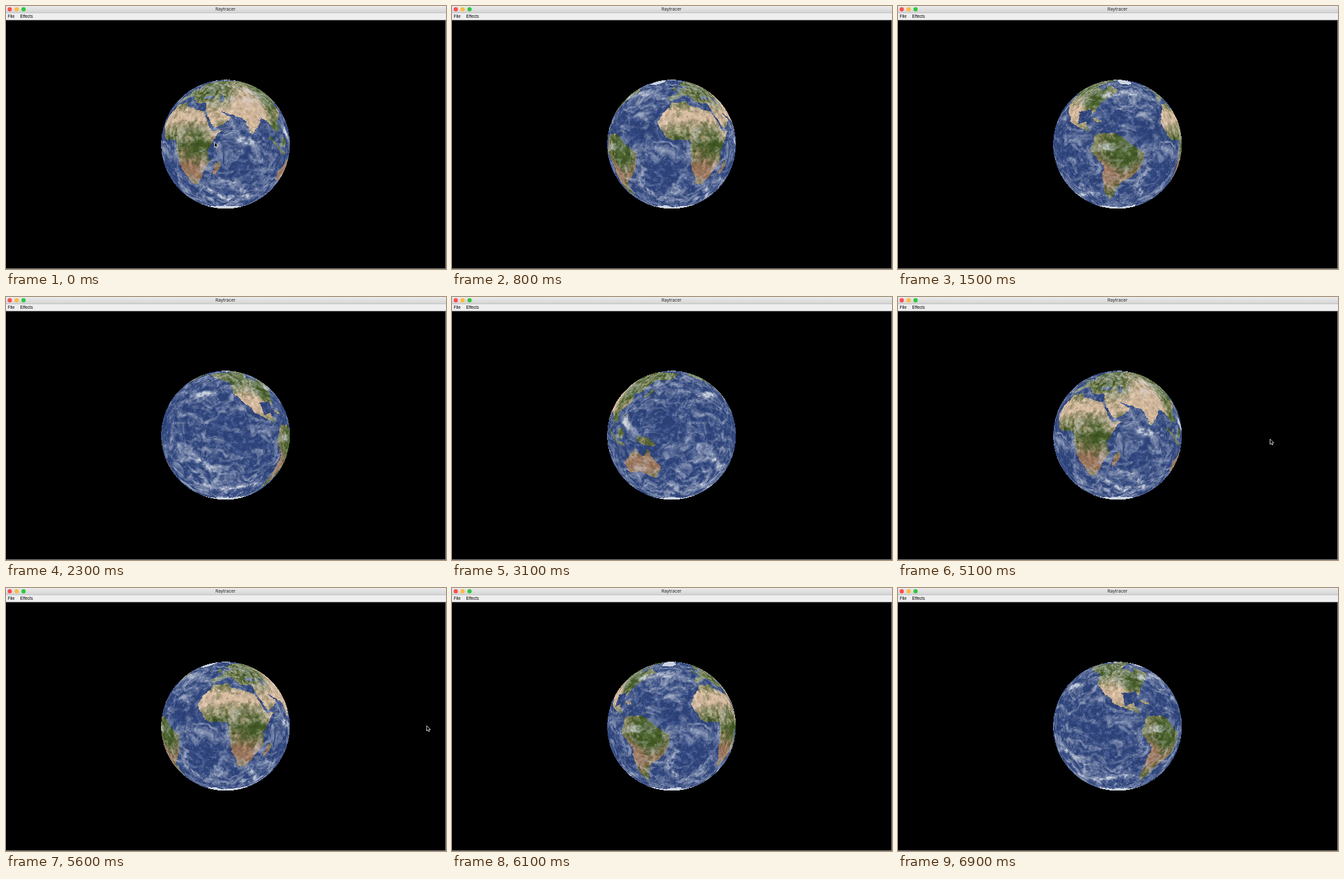
Animation, 670 px wide and 400 px high, one loop 7000 ms. Source, as an HTML page with a canvas:

```html
<!DOCTYPE html>
<html lang="en">
<head>
<meta charset="utf-8">
<title>Raytracer</title>
<style>
  html, body { margin: 0; width: 100%; height: 100%; overflow: hidden; background: #000; }
  #stage { position: absolute; left: 0; top: 0; width: 670px; height: 400px; overflow: hidden; background: #000; }
  #globe { position: absolute; left: 234px; top: 110px; }
  svg { position: absolute; left: 0; top: 0; }
  .title { font: 6.7px Inter, "Liberation Sans", sans-serif; fill: #222; text-anchor: middle; }
  .menu { font: 6.4px "Liberation Sans", Arial, sans-serif; fill: #000; }
</style>
</head>
<body>
<div id="stage">
  <canvas id="globe" width="200" height="200"></canvas>
  <svg width="670" height="400">
    <defs>
      <linearGradient id="bar" x2="0" y2="1">
        <stop stop-color="#ebebeb"/><stop offset="1" stop-color="#d3d3d3"/>
      </linearGradient>
    </defs>
    <rect width="670" height="10.5" fill="url(#bar)"/>
    <rect y="10" width="670" height="1" fill="#c4c4c4"/>
    <rect y="11" width="670" height="10.5" fill="#efefef"/>
    <circle cx="5.7" cy="5" r="3.2" fill="#fc4e50"/>
    <circle cx="16.2" cy="5" r="3.2" fill="#fdbb3f"/>
    <circle cx="26.7" cy="5" r="3.2" fill="#2fc840"/>
    <text class="title" x="334.3" y="7.4">Raytracer</text>
    <text class="menu" x="2.8" y="18">File</text>
    <text class="menu" x="21.6" y="18">Effects</text>
    <rect y="399" width="670" height="1" fill="#858585"/>
    <rect x="669" y="22" width="1" height="378" fill="#858585"/>
    <path id="pointer" d="M0 0V8L1.8 6.4 3.1 9.1 4.4 8.5 3.2 5.9H5.7Z" fill="#000" stroke="#fff" stroke-width=".75"/>
  </svg>
</div>
<script>
const W = 720, H = 360, LOOP = 7000, STEP = 100;
const clamp = v => Math.max(0, Math.min(1, v));
const mix = (a, b, k) => a + (b - a) * k;
const blend = (a, b, k) => a.map((v, i) => mix(v, b[i], k));
const bell = v => Math.exp(-v * v);
const mod = (a, n) => ((a % n) + n) % n;

// Seeded value noise that wraps around the globe
let seed = 11;
const lattice = Array.from({ length: 4096 }, () => {
  seed = (Math.imul(seed, 1664525) + 1013904223) >>> 0;
  return seed / 4294967296;
});
function noise(x, y, f) {
  x *= f; y *= f;
  const i = Math.floor(x), j = Math.floor(y);
  let u = x - i, v = y - j;
  u *= u * (3 - 2 * u); v *= v * (3 - 2 * v);
  const a = mod(i, f) * 57 + f * 17, b = mod(i + 1, f) * 57 + f * 17, c = j * 131;
  return mix(
    mix(lattice[(a + c) & 4095], lattice[(b + c) & 4095], u),
    mix(lattice[(a + c + 131) & 4095], lattice[(b + c + 131) & 4095], u), v);
}
function fbm(x, y, f, octaves) {
  let sum = 0, total = 0, amp = 1;
  for (let o = 0; o < octaves; o++, f *= 2, amp *= 0.62) {
    sum += amp * noise(x, y, f);
    total += amp;
  }
  return sum / total;
}

// Map layers in longitude and latitude
function layer() {
  const c = document.createElement('canvas');
  c.width = W; c.height = H;
  return c.getContext('2d', { willReadFrequently: true });
}
const pixels = ctx => ctx.getImageData(0, 0, W, H).data;
const mapX = lon => (lon + 180) * 2, mapY = lat => (90 - lat) * 2;
function trace(ctx, pts) {
  ctx.beginPath();
  for (let i = 0; i < pts.length; i += 2) ctx.lineTo(mapX(pts[i]), mapY(pts[i + 1]));
}
const ground = layer(), sky = layer();
function land(...pts) {
  trace(ground, pts);
  ground.fill();
}
function island(lon, lat, rx, ry, tilt = 0) {
  ground.beginPath();
  ground.ellipse(mapX(lon), mapY(lat), rx * 2, ry * 2, tilt, 0, 7);
  ground.fill();
}
function cloud(width, ...pts) {
  sky.lineWidth = width;
  trace(sky, pts);
  sky.stroke();
}

// Rough outlines; noise roughens the coasts later
function drawLand() {
  land(-17,18, -8,4, 9,4, 12,-17, 18,-34, 27,-34, 40,-15, 39,-4, 51,11.5, 43,11, 33,29, 11,33, 9,37, -6,36);
  land(-9,37, -9,43, -1,46, 8,54, 24,60, 6,59, 14,68, 26,71, 105,76, 180,68, 162,56, 140,54, 127,38, 118,38,
    122,30, 108,20, 108,11, 100,13, 104,2, 97,17, 90,22, 78,8, 72,21, 57,26, 48,30, 59,22, 45,13, 35,30,
    36,37, 22,37, 14,45, 3,43);
  land(-166,66, -128,70, -82,68, -94,59, -79,52, -72,61, -56,52, -75,38, -81,26, -84,30, -97,28, -95,18, -88,21,
    -83,10, -78,8, -105,20, -122,36, -125,48, -150,60);
  land(-81,-5, -77,8, -62,10, -50,1, -35,-7, -40,-21, -58,-37, -68,-54, -74,-48, -70,-18);
  land(114,-23, 130,-12, 139,-17, 142,-11, 153,-27, 147,-38, 131,-32, 116,-34);
  island(47, -19, 2.3, 6.5, .3);
  island(114, 1, 4.5, 4.5);
  island(141, -5, 9, 2.8, .4);
  island(138, 37, 1.7, 6, .8);
  island(-2, 54, 2.5, 4);
  island(-78, 21, 5, 1, .3);
  island(-90, 74, 25, 5);
  for (let k = 0; k <= 10; k++) island(96 + 2.2 * k, 5 - 13 * Math.sin(k * .16), 1.5, 1.2);
  for (let k = 0; k < 4; k++) island(121 + k, 17 - 3.5 * k, 1.2, 1.7);
  ground.globalCompositeOperation = 'destination-out';
  island(51, 42, 2.3, 4.5);
  island(35, 43, 6, 1.8);
}

// The most prominent cloud bands
function drawSky() {
  sky.lineCap = sky.lineJoin = 'round';
  sky.strokeStyle = '#fff';
  sky.filter = 'blur(3px)';
  cloud(5, 48,-29, 66,-33, 85,-50, 80,-60);
  cloud(6, 30,-37, 50,-51, 77,-60);
  cloud(8, -30,-18, -38,-35, -28,-46);
  cloud(8, -160,-15, -145,-28, -137,-29);
  cloud(7, -170,-42, -140,-52, -85,-46);
  cloud(8, -168,33, -135,40);
  cloud(8, -75,45, -38,50);
  cloud(9, 66,3, 87,0);
  cloud(10, -71,-1, -64,-1);
  cloud(9, 118,16, 124,6);
}

// Deserts near the tropics, forests elsewhere, with local exceptions: lon, lat, radius, dryness
const regions = [[80, 38, 20, .9], [105, 23, 14, -.9], [-83, 36, 14, -.8], [-108, 34, 12, .4],
  [-69, -26, 7, .6], [-54, -20, 14, -.5], [-60, -4, 13, -.3], [47, 7, 8, .8]];
function landColor(lon, lat, rough) {
  let dry = bell((Math.abs(lat) - 24) / 11) + .18 + rough;
  for (const [x, y, r, amount] of regions) dry += amount * bell(Math.hypot(lon - x, lat - y) / r);
  const sand = blend([150, 113, 86], [207, 181, 153], clamp((lat + 15) / 25));
  return blend([68, 92, 38], sand, clamp(dry));
}

function buildMap() {
  drawLand();
  drawSky();
  const mask = pixels(ground), bands = pixels(sky);
  const map = new Uint32Array(W * H);
  for (let j = 0; j < H; j++) {
    const lat = 90 - j / 2, y = j / W;
    const storms = bell((Math.abs(lat) - 52) / 17);
    for (let i = 0; i < W; i++) {
      const x = i / W, lon = i / 2 - 180;
      const wx = fbm(x, y + 3, 20, 3) - .5, wy = fbm(x, y + 7, 20, 3) - .5;
      const grain = fbm(x, y + 5, 140, 3);
      const wisps = fbm(x + wx * .09, y * 1.7 + wy * .09, 44, 5);
      const si = mod(Math.round(i + wx * 10 + (grain - .5) * 6), W);
      const sj = Math.max(0, Math.min(H - 1, Math.round(j + wy * 9)));
      const isLand = mask[(sj * W + si) * 4 + 3] > 128;
      const polar = lat > 79 + wx * 20 || lat < -69 + wx * 12
        || Math.hypot((lon + 42) / 16, (lat - 73) / 10) < 1 + wx;
      let rgb = [46, 68, 124], shade = .86 + .28 * grain;
      if (isLand) {
        rgb = landColor(lon, lat, wx + (grain - .5) * .8);
        shade = .8 + .4 * grain;
      }
      let cover = clamp((wisps - .44 + storms * .07) * 1.9) * .8 + clamp(grain - .5) * .6;
      cover += bands[(j * W + i) * 4 + 3] / 255 * clamp(wisps + grain - .55);
      if (isLand) cover *= clamp(1 - bell((lat - 24) / 12)) * .8 + .15;
      if (polar) cover = .95;
      rgb = blend(rgb.map(v => v * shade), [214, 220, 230], Math.min(.95, cover));
      map[j * W + i] = (255 << 24 | rgb[2] << 16 | rgb[1] << 8 | rgb[0]) >>> 0;
    }
  }
  return map;
}

// Cast one ray per pixel; only the longitude changes over time
const screen = document.getElementById('globe').getContext('2d');
const frame = screen.createImageData(200, 200), out = new Uint32Array(frame.data.buffer);
const hits = [];
function castRays() {
  const R = 98, D = 10, k = 1 / Math.sqrt(D * D - 1);
  for (let p = 0; p < 40000; p++) {
    const u = (p % 200 - 99.8) / R, v = (99.8 - Math.floor(p / 200)) / R, r = u * u + v * v;
    if (r >= 1) continue;
    const t = (D - Math.sqrt(1 - r)) / (1 + k * k * r);
    const lat = Math.asin(v * k * t), lon = Math.atan2(u * k * t, D - t);
    const row = Math.min(H - 1, Math.floor((.5 - lat / Math.PI) * H));
    hits.push({ p, row: row * W, x: lon / Math.PI * W / 2 });
  }
}
function drawGlobe(lon) {
  const shift = mapX(lon);
  for (const h of hits) out[h.p] = map[h.row + mod(Math.floor(h.x + shift), W)];
  screen.putImageData(frame, 0, 0);
}

// Key poses: time, then longitude or pointer position
const spin = [[0, 55], [1500, -59], [2300, -131], [3800, -255], [5100, -311.5], [7000, -470]];
const path = [[0, 317.5, 207], [200, 317.5, 207], [750, 690, 300], [3200, 690, 80], [3600, 566.5, 216],
  [5300, 566.5, 216], [5800, 690, 205], [7000, 690, 205]];
function at(rows, t) {
  const n = rows.findIndex(r => r[0] > t), a = rows[n - 1], b = rows[n];
  return blend(a.slice(1), b.slice(1), (t - a[0]) / (b[0] - a[0]));
}

const map = buildMap(), pointer = document.getElementById('pointer');
castRays();
let shown = -1;
function tick() {
  const t = Math.floor(performance.now() % LOOP / STEP) * STEP;
  if (t !== shown) {
    shown = t;
    drawGlobe(at(spin, t)[0]);
    pointer.setAttribute('transform', `translate(${at(path, t)})`);
  }
  requestAnimationFrame(tick);
}
tick();
</script>
</body>
</html>
```
